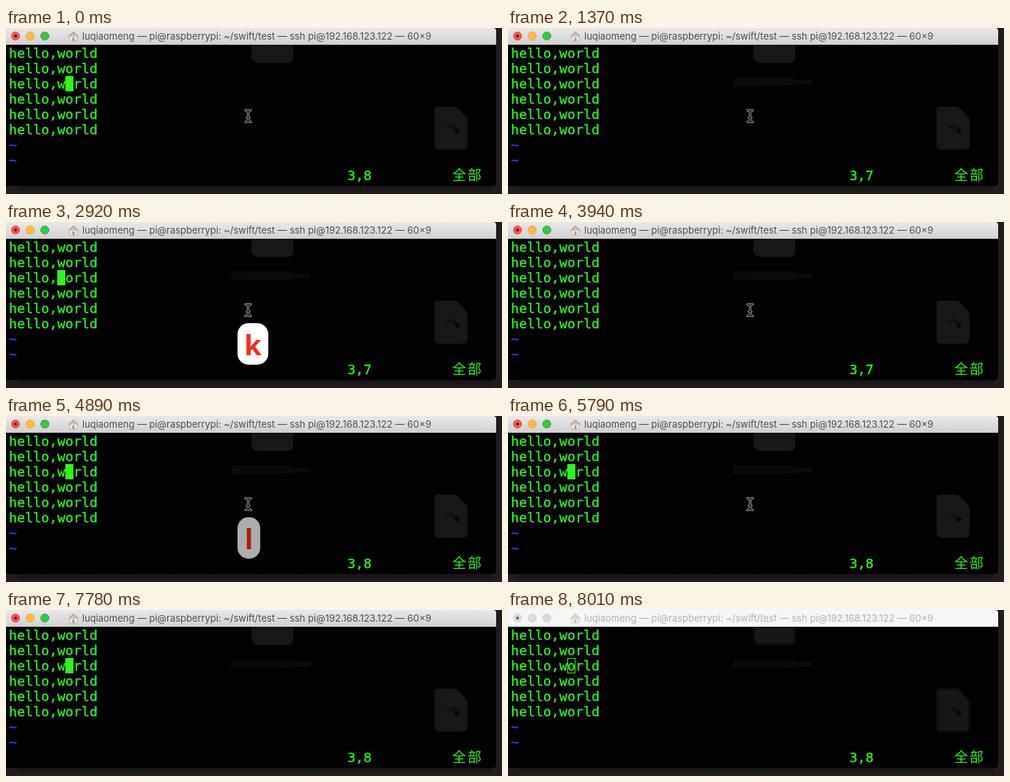
Animation of 677x228 px, one loop 8110 ms. Source, as an HTML page:

```html
<!DOCTYPE html>
<html lang="en">
<head>
<meta charset="utf-8">
<title>Moving the cursor with h, j, k, l</title>
<style>
  html, body { margin: 0; width: 100%; height: 100%; overflow: hidden; background: #1f1d1e; }
  svg { display: block; width: 677px; height: 228px; }
  text { white-space: pre; }
  .term { font: 18.27px "DejaVu Sans Mono", monospace; fill: #2cf021; stroke: #2cf021; stroke-width: .4; }
  .tilde { fill: #4f32e6; stroke: #4f32e6; }
  .cjk { font: 500 19px "Noto Sans CJK SC", "Noto Sans CJK", sans-serif; letter-spacing: 2px; fill: #2cf021; }
  .title { font: 12.95px Inter, sans-serif; fill: #525252; }
  .key { font: 600 38px "Noto Sans", sans-serif; text-anchor: middle; fill: #f0301c; }
  .inactive #bar { fill: #f6f6f6; }
  .inactive .title { fill: #b4b4b4; }
  .inactive .light { fill: #dcdcdc; stroke: #cfcfcf; }
  .inactive #unsaved { fill: #666; }
  .inactive #home { opacity: .55; }
</style>
</head>
<body>
<svg id="stage" viewBox="0 0 677 228">
  <defs>
    <linearGradient id="barFill" x2="0" y2="1">
      <stop stop-color="#e9e9e9"/><stop offset="1" stop-color="#d0d0d0"/>
    </linearGradient>
    <linearGradient id="shadow" x2="0" y2="1">
      <stop stop-color="#161515"/><stop offset="1" stop-color="#1f1d1e"/>
    </linearGradient>
    <filter id="soft"><feGaussianBlur stdDeviation="2"/></filter>
  </defs>

  <rect width="677" height="228" fill="#1f1d1e"/>
  <rect x="15" y="217" width="648" height="11" fill="url(#shadow)"/>
  <path d="M0 10H669V212q0 5-5 5H0z" fill="#020202"/>

  <!-- desktop icons showing dimly through the window -->
  <g id="ghosts">
    <path d="M335 22H392V40q0 8-8 8H345q-6 0-10-6z" fill="#171717"/>
    <path d="M585 112q0-4 4-4H613q6 3 17 17V161q0 6-6 6H591q-6 0-6-6z" fill="#171717"/>
    <path d="M598 138q6-7 14-4l7 6-3 6-5-6q-6-4-13-2z" fill="#0d1111"/>
    <circle cx="615.5" cy="142" r="3" fill="#050606"/>
  </g>
  <path id="smear" d="M309 68H390v3h24l2 6-30 2-80 1z" fill="#0b0a08"/>

  <path id="bar" d="M0 0H665q4 0 4 4V23H0z" fill="url(#barFill)"/>
  <g stroke-width=".7">
    <circle class="light" cx="13" cy="11" r="5.7" fill="#fc5650" stroke="#de423c"/>
    <circle class="light" cx="33" cy="11" r="5.7" fill="#fdbc40" stroke="#dd9f34"/>
    <circle class="light" cx="53" cy="11" r="5.7" fill="#34c84a" stroke="#28a43a"/>
    <circle id="unsaved" cx="13" cy="11" r="2" fill="#4b1714"/>
  </g>
  <g id="home">
    <path d="M87 11H97V18H87z" fill="#f1ece4" stroke="#b5aca1" stroke-width=".8"/>
    <path d="M85.5 12L92 5.5L98.5 12" fill="#d3c2b2" stroke="#b3a090" stroke-width="1.2"/>
    <path d="M90.5 13h3v5h-3z" fill="#b09a89"/>
  </g>
  <text class="title" x="104" y="16">luqiaomeng — pi@raspberrypi: ~/swift/test — ssh pi@192.168.123.122 — 60×9</text>

  <g id="lines"></g>
  <text class="term" id="status" x="466" y="209"></text>
  <text class="cjk" x="609" y="209">全部</text>
  <rect id="cursor" stroke="#30f41e"/>

  <g id="pointer" fill="none" stroke-linecap="round">
    <path class="beam" stroke="#c8c8c8" stroke-width="3.2"/>
    <path class="beam" stroke="#080808" stroke-width="1.6"/>
  </g>

  <g id="keycap">
    <rect id="cap" x="316" y="139" height="57" rx="15" fill="#fff"/>
    <text class="key" id="letter" y="183"></text>
  </g>
</svg>

<script>
const LOOP = 8110, CELL = 11, ROW = 21, LEFT = 4, TOP = 24;
const BLUR_AT = 7960, EXIT_AT = 5960, EXIT_STEP = 56;
const $ = id => document.getElementById(id);
const set = (id, attrs) => {
  for (const name in attrs) $(id).setAttribute(name, attrs[name]);
};

// Each press moves the cursor and shows a keycap that fades in coarse steps.
const presses = [
  { at: 350, until: 1010, key: "h", width: 43, row: 3, col: 7, fade: [.5] },
  { at: 1730, until: 2390, key: "j", width: 31, row: 4, col: 7, fade: [.5] },
  { at: 2920, until: 3520, key: "k", width: 42, row: 3, col: 7, fade: [.5] },
  { at: 4300, until: 4890, key: "l", width: 31, row: 3, col: 8, fade: [.68, .33] }
];
const start = { row: 3, col: 8 };
const blinkOff = [[1370, 1730], [2740, 2920], [3940, 4300], [5310, 5790], [6240, 6770], [7240, 7780]];

for (let row = 1; row <= 8; row++) {
  const empty = row > 6;
  const line = document.createElementNS("http://www.w3.org/2000/svg", "text");
  line.setAttribute("class", empty ? "term tilde" : "term");
  line.setAttribute("x", LEFT);
  line.setAttribute("y", TOP + 17 + (row - 1) * ROW);
  line.textContent = empty ? "~" : "hello,world";
  $("lines").append(line);
}

for (const beam of document.querySelectorAll(".beam")) {
  beam.setAttribute("d", "M-3.5 -8Q0 -8 0 -5.5V5.5Q0 8 -3.5 8M3.5 -8Q0 -8 0 -5.5V5.5Q0 8 3.5 8M-1.5 2H1.5");
}

function drawCursor(t, { row, col }) {
  const hollow = t >= BLUR_AT;
  const hidden = blinkOff.some(([from, to]) => t >= from && t < to);
  const inset = hollow ? .5 : 0;
  set("cursor", {
    x: LEFT + (col - 1) * CELL + inset,
    y: TOP + (row - 1) * ROW + inset,
    width: CELL - 2 * inset,
    height: ROW - 2 * inset,
    fill: hollow ? "none" : "#30f41e",
    "stroke-width": hollow ? 1 : 0,
    visibility: hidden ? "hidden" : "visible"
  });
  $("status").textContent = row + "," + col;
}

function drawKeycap(t, press) {
  let opacity = 0;
  if (press) {
    const step = Math.floor((t - press.until) / 60);
    opacity = step < 0 ? 1 : press.fade[step] || 0;
    set("cap", { width: press.width });
    set("letter", { x: 316 + press.width / 2 });
    $("letter").textContent = press.key;
  }
  set("keycap", { opacity });
}

function drawPointer(t) {
  const step = t < EXIT_AT ? 0 : Math.floor((t - EXIT_AT) / EXIT_STEP) + 1;
  const p = step / 8;
  set("pointer", {
    transform: `translate(${330.5 + 14 * p} ${121 + 90 * p})`,
    visibility: p < 1 ? "visible" : "hidden"
  });
}

function draw(t) {
  const press = presses.filter(p => p.at <= t).pop();
  const inactive = t >= BLUR_AT;
  drawCursor(t, press || start);
  drawKeycap(t, press);
  drawPointer(t);
  set("stage", { class: inactive ? "inactive" : "" });
  set("ghosts", { filter: inactive ? "url(#soft)" : "none" });
  set("smear", { visibility: t >= 60 ? "visible" : "hidden" });
}

const begin = performance.now();
function frame() {
  draw((performance.now() - begin) % LOOP);
  requestAnimationFrame(frame);
}
frame();
</script>
</body>
</html>
```
